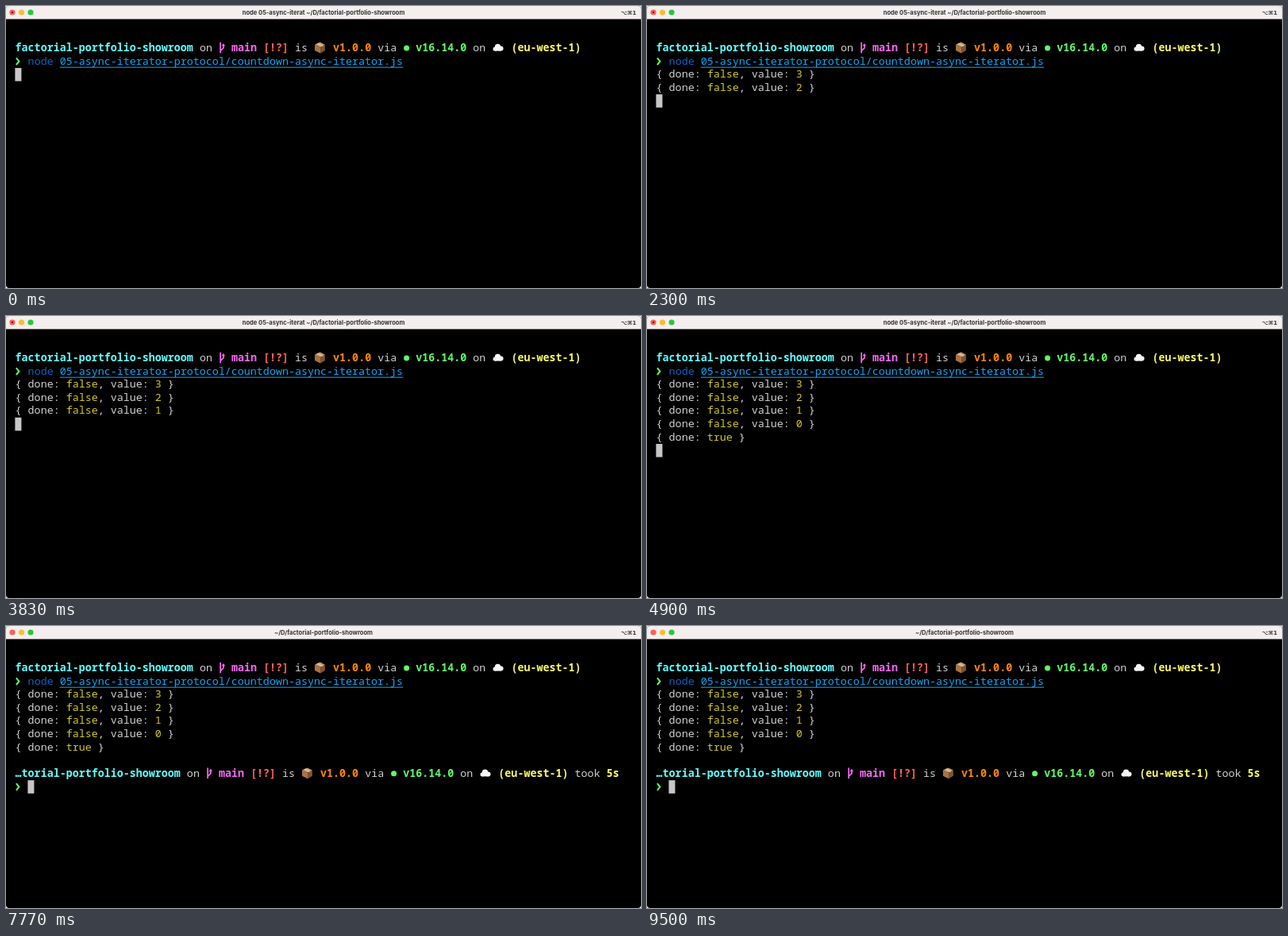
An HTML page with a canvas for the animation above (9530 ms loop, 800x355 px).

```html
<!DOCTYPE html>
<html lang="en">
<head>
<meta charset="utf-8">
<title>Terminal countdown</title>
<style>
  html, body { margin: 0; width: 100%; height: 100%; overflow: hidden; background: #fff; }
  canvas { display: block; width: 800px; height: 355px; }
</style>
</head>
<body>
<canvas id="stage"></canvas>
<script>
const WIDTH = 800, HEIGHT = 355, LOOP = 9530;
const CELL = 8.01, ROW = 16.6, LEFT = 11.6, TOP = 44.8, BASELINE = 12.2;
const FIRST_LINE = 870, LINE_INTERVAL = 1000, PROMPT_AT = 5070;
const MONO = '13.35px "Noto Sans Mono", "DejaVu Sans Mono", monospace';
const PROJECT = 'factorial-portfolio-showroom';
const COLOR = {
  text: '#d2d2d2', cursor: '#c7c7c7', cyan: '#60fdff', magenta: '#f768f2', red: '#ff6259',
  orange: '#ff8700', green: '#5ff967', yellow: '#fefb67', value: '#d0c829',
  command: '#0f62c4', path: '#12a5f4'
};

const canvas = document.getElementById('stage');
const ctx = canvas.getContext('2d');
const ratio = window.devicePixelRatio || 1;
canvas.width = WIDTH * ratio;
canvas.height = HEIGHT * ratio;
ctx.scale(ratio, ratio);

const colX = col => LEFT + col * CELL;
const rowY = row => TOP + row * ROW;

function write(col, row, text, color = COLOR.text, bold = false) {
  ctx.font = (bold ? 'bold ' : '500 ') + MONO;
  ctx.textAlign = 'left';
  ctx.fillStyle = color;
  ctx.fillText(text, colX(col), rowY(row) + BASELINE);
}

function circle(x, y, radius, color) {
  ctx.fillStyle = color;
  ctx.beginPath();
  ctx.arc(x, y, radius, 0, Math.PI * 2);
  ctx.fill();
}

// Runs a drawing routine with its origin at the top left of a cell.
function atCell(col, row, draw) {
  ctx.save();
  ctx.translate(colX(col), rowY(row));
  draw();
  ctx.restore();
}

function shape(path, color) {
  ctx.fillStyle = color;
  ctx.fill(new Path2D(path));
}

function line(path, color, width) {
  ctx.strokeStyle = color;
  ctx.lineWidth = width;
  ctx.stroke(new Path2D(path));
}

function branchIcon() {
  line('M2.2 1V14.5M2.2 11.5L6 8V4', COLOR.magenta, 1.7);
  shape('M3.6 5.4L6 2.2L8.2 5.4Z', COLOR.magenta);
}

function boxIcon() {
  shape('M.9 4L7.5 .8L13.8 4L8 7.2Z', '#c79a6c');
  shape('M.9 4L8 7.2V14.6L.9 11.2Z', '#a87446');
  shape('M13.8 4L8 7.2V14.6L13.8 11.2Z', '#805432');
  shape('M3.2 2.8L5 2L11.6 5.2L9.9 6.2Z', '#e2c79e');
}

function cloudIcon() {
  circle(3.8, 9.2, 2.6, '#f4f6f8');
  circle(7.2, 6.7, 3.7, '#f4f6f8');
  circle(11.2, 8.8, 3, '#f4f6f8');
  ctx.fillRect(3.8, 8, 7.4, 3.8);
}

function arrow(row) {
  atCell(0, row, () => line('M1.3 4L4.8 8.3L1.3 12.6', COLOR.green, 2));
}

function prompt(row, directory) {
  const end = directory.length;
  const word = (offset, text, color) => write(end + offset, row, text, color, !!color);
  const icon = (offset, draw) => atCell(end + offset, row, draw);
  write(0, row, directory, COLOR.cyan, true);
  word(1, 'on');
  icon(4, branchIcon);
  word(6, 'main', COLOR.magenta);
  word(11, '[!?]', COLOR.red);
  word(16, 'is');
  icon(19, boxIcon);
  word(22, 'v1.0.0', COLOR.orange);
  word(29, 'via');
  icon(33, () => circle(4.4, 8.2, 3.5, COLOR.green));
  word(35, 'v16.14.0', COLOR.green);
  word(44, 'on');
  icon(47, cloudIcon);
  word(50, '(eu-west-1)', COLOR.yellow);
  arrow(row + 1);
}

function command(row) {
  const file = '05-async-iterator-protocol/countdown-async-iterator.js';
  write(2, row, 'node', COLOR.command);
  write(7, row, file, COLOR.path);
  ctx.fillRect(colX(7), 76.7, file.length * CELL, 1);
}

function output(index) {
  const row = index + 2;
  write(0, row, '{ done:');
  if (index < 4) {
    write(8, row, 'false', COLOR.value);
    write(13, row, ', value:');
    write(22, row, String(3 - index), COLOR.value);
    write(24, row, '}');
  } else {
    write(8, row, 'true', COLOR.value);
    write(13, row, '}');
  }
}

function windowFrame(running) {
  ctx.fillStyle = '#fff';
  ctx.fillRect(0, 0, WIDTH, HEIGHT);
  ctx.save();
  ctx.beginPath();
  ctx.roundRect(0, 0, WIDTH, HEIGHT, 4);
  ctx.clip();
  ctx.fillStyle = '#000';
  ctx.fillRect(0, 0, WIDTH, HEIGHT);
  ctx.fillStyle = '#f4efee';
  ctx.fillRect(0, 0, WIDTH, 16.5);
  ctx.restore();

  ['#fe5f57', '#febc2e', '#28c840'].forEach((color, i) => circle(8 + i * 11.5, 8, 3.6, color));
  if (running) circle(8, 8, 1.2, '#7d150f');

  ctx.fillStyle = '#343434';
  ctx.textAlign = 'center';
  ctx.font = '700 7.55px Inter, "Open Sans", sans-serif';
  ctx.fillText((running ? 'node 05-async-iterat ' : '') + '~/D/' + PROJECT, WIDTH / 2, 10.7);
  ctx.textAlign = 'right';
  ctx.font = 'bold 6.9px "DejaVu Sans", sans-serif';
  ctx.fillText('⌥⌘1', 794, 10.5);
}

function cursor(col, row) {
  ctx.fillStyle = COLOR.cursor;
  ctx.fillRect(colX(col) - 0.2, rowY(row), CELL, ROW);
}

function render(time) {
  const running = time < PROMPT_AT;
  const elapsed = Math.floor((time - FIRST_LINE) / LINE_INTERVAL) + 1;
  const lines = Math.max(0, Math.min(5, elapsed));

  windowFrame(running);
  prompt(0, PROJECT);
  command(1);
  for (let i = 0; i < lines; i++) output(i);

  if (running) {
    cursor(0, 2 + lines);
  } else {
    prompt(8, '…' + PROJECT.slice(3));
    write(88, 8, 'took');
    write(93, 8, '5s', COLOR.yellow, true);
    cursor(2, 9);
  }
}

function tick() {
  render(performance.now() % LOOP);
  requestAnimationFrame(tick);
}
tick();
</script>
</body>
</html>
```
